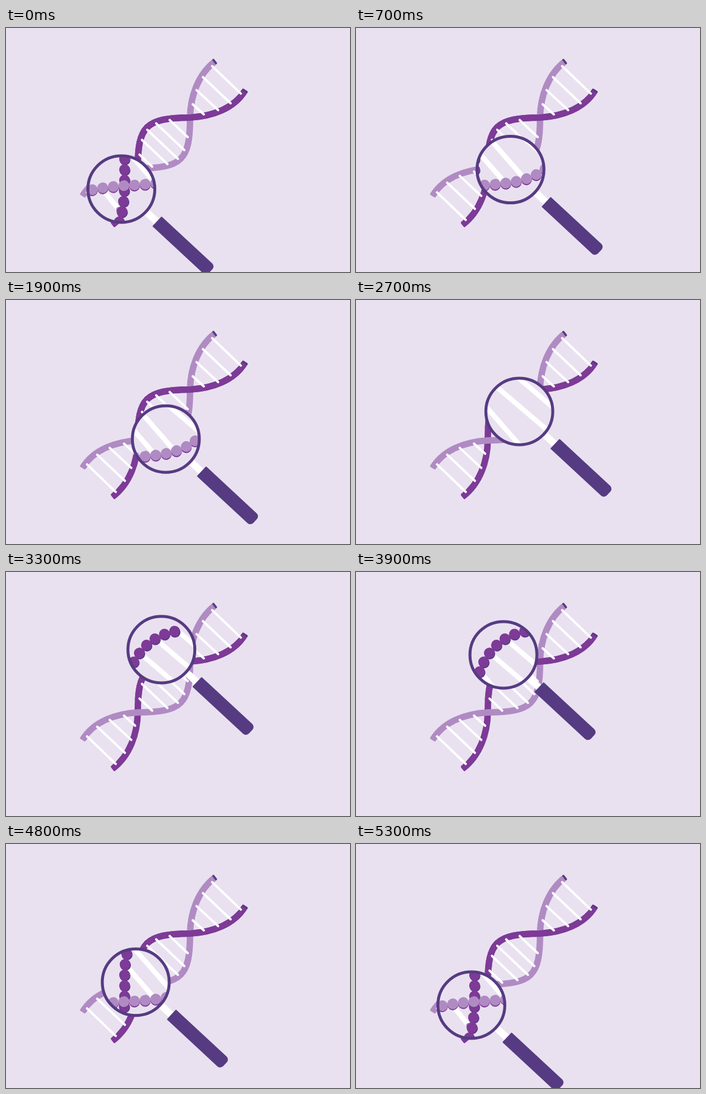
These frames come from a looping animation (586 px wide and 418 px high, 5600 ms). An HTML page with a canvas:

```html
<!DOCTYPE html>
<html lang="en">
<head>
<meta charset="utf-8">
<title>DNA under a magnifier</title>
<style>
html, body { margin: 0; width: 100%; height: 100%; overflow: hidden; background: #e9e1f0; }
canvas { display: block; }
</style>
</head>
<body>
<canvas id="stage" width="586" height="418"></canvas>
<script>
const ctx = document.getElementById('stage').getContext('2d');
const BG = '#e9e1f0', DARK = '#7d3a97', LIGHT = '#b08bc3', INK = '#563b82', WHITE = '#ffffff';
const LOOP = 5600, STEP = 100, LAST = 5300;
const LENS_R = 57, HANDLE_ANGLE = 43 * Math.PI / 180;

// The dark strand as three cubics; the light one is its half-turn image
const strandCurves = [
  [[182.5, 336.5], [211, 314], [224, 277], [224.5, 240]],
  [[224.5, 240], [224.5, 168], [238, 154], [313, 153.5]],
  [[313, 153.5], [352, 151], [388, 138], [407, 107.5]]
];
const halfTurn = ([x, y]) => [538 - x, 394 - y];

// The enlarged strands, strung with beads
const darkBeadCurves = [
  [[193, 332], [203, 304], [202, 265], [202, 224]],
  [[202, 224], [202, 165], [230, 104], [305, 99]]
];
const lightBeadCurves = [[[147, 277], [215, 262], [290, 279], [333, 231]]];

// Lens centre: time, x, y
const route = [
  [0, 196.5, 276], [600, 260.5, 243.8], [1200, 270.3, 239.3], [1800, 271.5, 239],
  [2400, 278.6, 219.3], [2700, 278.2, 191], [3300, 264.7, 133], [3600, 257.5, 129.8],
  [4200, 244, 166], [4800, 221, 236.8], [5300, 196.5, 276]
];

// Harmonic mean of the neighbouring speeds; zero at turning points and ends
function slope(i, axis) {
  if (i === 0 || i === route.length - 1) return 0;
  const speed = (p, q) => (q[axis] - p[axis]) / (q[0] - p[0]);
  const a = speed(route[i - 1], route[i]), b = speed(route[i], route[i + 1]);
  return a * b > 0 ? 2 * a * b / (a + b) : 0;
}

function lensAt(t) {
  let i = 0;
  while (i < route.length - 2 && t >= route[i + 1][0]) i++;
  const a = route[i], b = route[i + 1], span = b[0] - a[0];
  const u = (t - a[0]) / span, v = 1 - u;
  return [1, 2].map(k =>
    a[k] * v * v * (1 + 2 * u) + b[k] * u * u * (3 - 2 * u) +
    span * u * v * (v * slope(i, k) - u * slope(i + 1, k)));
}

function pointOn([a, b, c, d], t) {
  const s = 1 - t;
  return [0, 1].map(k =>
    s * s * s * a[k] + 3 * s * s * t * b[k] + 3 * s * t * t * c[k] + t * t * t * d[k]);
}

function toPath(curves) {
  const path = new Path2D();
  path.moveTo(...curves[0][0]);
  for (const [, b, c, d] of curves) path.bezierCurveTo(...b, ...c, ...d);
  return path;
}
const strandPath = toPath(strandCurves);
const darkBeads = toPath(darkBeadCurves), lightBeads = toPath(lightBeadCurves);

function line([x1, y1], [x2, y2], color, width, cap = 'round') {
  ctx.strokeStyle = color;
  ctx.lineWidth = width;
  ctx.lineCap = cap;
  ctx.beginPath();
  ctx.moveTo(x1, y1);
  ctx.lineTo(x2, y2);
  ctx.stroke();
}

// Rounded tip across the end of a strand
function tip([x, y], [cx, cy], color) {
  const k = 3.6 / Math.hypot(x - cx, y - cy);
  const nx = (cy - y) * k, ny = (x - cx) * k;
  line([x - nx, y - ny], [x + nx, y + ny], color, 3.6);
}

function strand(color, startColor, endColor) {
  ctx.strokeStyle = color;
  ctx.lineWidth = 11;
  ctx.lineCap = 'butt';
  ctx.stroke(strandPath);
  const first = strandCurves[0], last = strandCurves[2];
  tip(first[0], first[1], startColor);
  tip(last[3], last[2], endColor);
}

function rung(part, t) {
  const a = pointOn(strandCurves[part], t);
  const b = halfTurn(pointOn(strandCurves[2 - part], 1 - t));
  const inset = 3 / Math.hypot(b[0] - a[0], b[1] - a[1]);
  const at = f => [a[0] + (b[0] - a[0]) * f, a[1] + (b[1] - a[1]) * f];
  line(at(inset), at(1 - inset), WHITE, 4);
}

function drawHelix() {
  strand(DARK, DARK, INK);
  ctx.save();
  ctx.translate(...halfTurn([0, 0]));
  ctx.scale(-1, -1);
  strand(LIGHT, INK, LIGHT);
  ctx.restore();
  // The dark strand passes in front at the upper crossing
  ctx.save();
  ctx.beginPath();
  ctx.rect(0, 120, 586, 100);
  ctx.clip();
  strand(DARK, DARK, INK);
  ctx.restore();
  for (let i = 0; i < 4; i++) {
    rung(0, 0.08 + 0.23 * i);
    rung(2, 0.92 - 0.23 * i);
  }
  for (let i = 0; i < 5; i++) rung(1, 0.13 + 0.17 * i);
}

// Round-capped dots spaced evenly along a path
function beads(path, color, shade, dx, dy) {
  ctx.save();
  ctx.lineCap = 'round';
  ctx.lineWidth = 18.4;
  ctx.setLineDash([0.01, 18.1]);
  ctx.translate(dx, dy);
  ctx.strokeStyle = shade;
  ctx.stroke(path);
  ctx.translate(-dx, -dy);
  ctx.strokeStyle = color;
  ctx.stroke(path);
  ctx.restore();
}

function drawMagnified() {
  for (let i = 0; i < 5; i++) {
    const [x, y] = pointOn(darkBeadCurves[1], 0.1 + 0.21 * i);
    const angle = (i < 2 ? 49 : 40.6) * Math.PI / 180;
    const length = 140 - 15 * (i - 2) ** 2;
    line([x, y], [x + length * Math.cos(angle), y + length * Math.sin(angle)], WHITE, 8.5, 'butt');
  }
  line([164, 276], [192, 311], WHITE, 8.5, 'butt');
  line([192, 311], [194, 313], LIGHT, 9);
  beads(darkBeads, DARK, INK, 0.7, 1.7);
  beads(lightBeads, LIGHT, DARK, 0, 1.9);
}

function drawLens(x, y) {
  ctx.save();
  ctx.translate(x, y);
  ctx.rotate(HANDLE_ANGLE);
  ctx.fillStyle = WHITE;
  ctx.fillRect(56, -6.5, 30, 12);
  ctx.fillStyle = INK;
  ctx.beginPath();
  ctx.roundRect(82, -12.5, 125, 23, [1, 7, 7, 1]);
  ctx.fill();
  ctx.restore();

  const rim = new Path2D();
  rim.arc(x, y, LENS_R, 0, 2 * Math.PI);
  ctx.fillStyle = BG;
  ctx.fill(rim);
  ctx.save();
  ctx.clip(rim);
  drawMagnified();
  ctx.restore();
  ctx.strokeStyle = INK;
  ctx.lineWidth = 5;
  ctx.stroke(rim);
}

function frame(now) {
  const t = Math.min(LAST, Math.floor((now % LOOP) / STEP) * STEP);
  ctx.fillStyle = BG;
  ctx.fillRect(0, 0, 586, 418);
  drawHelix();
  drawLens(...lensAt(t));
  requestAnimationFrame(frame);
}
frame(performance.now());
</script>
</body>
</html>
```
